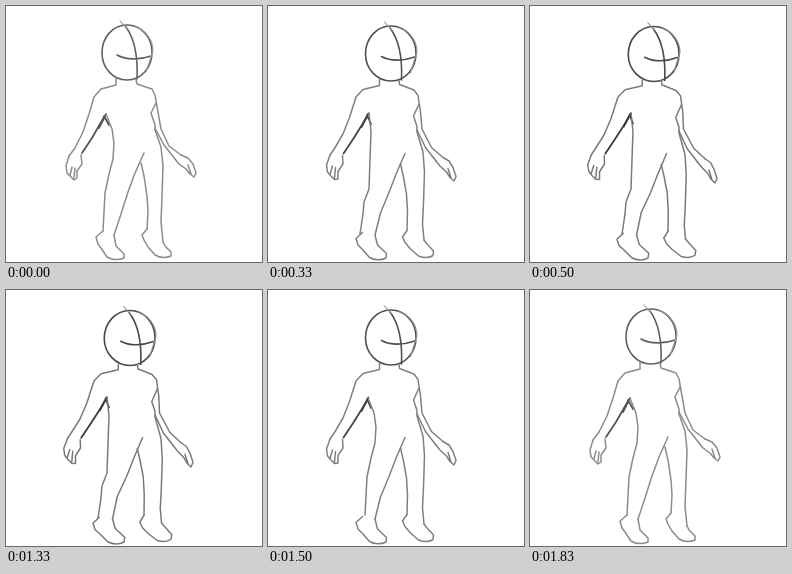
Recreate the animation shown at these times as an HTML page without scripts. Size 256x256 px, loop 2500 ms.

```html
<!DOCTYPE html>
<html lang="en">
<head>
<meta charset="utf-8">
<title>Figure study</title>
<style>
  html, body { margin: 0; width: 100%; height: 100%; overflow: hidden; background: #fff; }
  svg { display: block; width: 100vw; height: 100vh; }
  path {
    d: var(--up);
    fill: none;
    stroke: #777;
    stroke-width: 1.5;
    stroke-linecap: round;
    stroke-linejoin: round;
    animation: settle 2.5s infinite;
  }
  .head { stroke-width: 1.6; --soft: #606060; --firm: #404040; }
  .body { --soft: #8c8c8c; --firm: #747474; }
  .dark { stroke-width: 1.8; --soft: #555; --firm: #333; }
  .faint { stroke-width: 1.1; --soft: #999; --firm: #888; }

  /* Four held poses down, a pause, then the same poses back up. */
  @keyframes settle {
    0% {
      d: var(--up); stroke: var(--soft);
      animation-timing-function: steps(4, end);
      animation-timing-function: linear(0 0% 24.23%, .25 24.23% 49.99%, .5 49.99% 75.75%, .75 75.75% 100%, 1);
    }
    26.4% { d: var(--down); stroke: var(--firm); }
    53.199% {
      d: var(--down); stroke: var(--firm);
      animation-timing-function: steps(3, start);
      animation-timing-function: linear(.25 0% 34%, .5 34% 66%, .75 66% 100%, 1);
    }
    73.199%, 100% { d: var(--up); stroke: var(--soft); }
  }
</style>
</head>
<body>
<svg viewBox="0 0 256 256" role="img" aria-label="Pencil sketch of a standing figure">
  <!-- head and guide lines -->
  <path class="head" style="
    --up: path('M121 19C106 19 96 32 96 47C96 62 107 74 121 74C135 74 146 62 146 46C146 31 135 19 121 19');
    --down: path('M125 21C110 21 99 34 99 49C99 64 111 76 125 76C139 76 150 64 150 48C150 33 139 21 125 21')"/>
  <path class="head" style="
    --up: path('M120 21C128 32 132 50 131 73');
    --down: path('M124 23C133 34 137 52 136 75')"/>
  <path class="head" style="
    --up: path('M111 49C120 54 134 54 145 50');
    --down: path('M116 52C125 57 138 56 148 52')"/>
  <path class="faint" style="
    --up: path('M114 15L121 23M129 20C141 25 147 35 147 45L140 66');
    --down: path('M119 17L126 25M133 22C145 27 151 37 151 47L145 67')"/>

  <!-- shoulders and arms -->
  <path class="body" style="
    --up: path('M110 72L110 79L95 83L88 91L83 108L77 126L69 142L63 150');
    --down: path('M113 75L113 80L95 84L88 91L80 115L73 130L64 143L61 148')"/>
  <path class="dark" style="
    --up: path('M100 108L94 118L86 132L76 147');
    --down: path('M101 107L95 118L85 133L75 148')"/>
  <path class="dark" style="
    --up: path('M98 112L93 122M98 110L103 119');
    --down: path('M99 111L94 120M100 108L103 117')"/>
  <path class="body" style="
    --up: path('M63 150L60 160L61 167L65 171L68 174L71 172L71 165L76 158L75 149M64 169L66 161M68 172L69 162');
    --down: path('M61 148L57 158L58 165L61 169L65 173L69 174L69 166L74 158L74 150M60 168L63 159M65 172L66 161')"/>
  <path class="body" style="
    --up: path('M130 73L131 78L146 83L149 89L152 106L155 123L163 140L175 149');
    --down: path('M132 75L132 79L146 85L151 90L153 106L153 123L164 143L175 154')"/>
  <path class="body" style="
    --up: path('M149 122L158 139L169 153');
    --down: path('M149 126L157 144L167 157')"/>
  <path class="body" style="
    --up: path('M175 149L182 152L187 158L190 167L188 171L184 168L180 163L173 158L169 153M185 168L182 159');
    --down: path('M175 154L180 158L183 165L186 174L184 179L180 175L177 169L171 162L167 157M181 176L178 166')"/>

  <!-- torso -->
  <path class="body" style="
    --up: path('M100 108L106 123L108 137L107 153L103 168L99 187L98 206L97 225');
    --down: path('M101 107L103 126L102 153L101 183L96 196L95 208L92 228')"/>
  <path class="body" style="
    --up: path('M150 97L145 107L149 119L149 124L155 141L157 160L156 190L155 216L157 236');
    --down: path('M152 99L146 113L149 122L149 128L155 151L156 172L155 204L154 220L155 232')"/>

  <!-- legs and feet -->
  <path class="body" style="
    --up: path('M138 147L129 167L122 186L115 208L108 229');
    --down: path('M136 148L128 167L120 187L110 206L106 229')"/>
  <path class="body" style="
    --up: path('M97 225L90 231L92 238L95 242L101 251C106 254 113 254 118 252L118 248L110 240L108 229');
    --down: path('M92 228L86 234L88 240L94 245L102 252C107 255 114 255 118 252L119 247L109 238L106 229')"/>
  <path class="body" style="
    --up: path('M135 157L138 170L141 190L142 205L141 223');
    --down: path('M130 159L133 172L136 186L137 205L137 226')"/>
  <path class="body" style="
    --up: path('M141 223L136 229L138 234L142 241L149 249C154 252 160 252 165 250L165 246L159 240L157 236');
    --down: path('M137 226L133 233L136 239L143 245L152 251C157 252 162 252 165 249L166 244L159 236L155 232')"/>
</svg>
</body>
</html>
```
